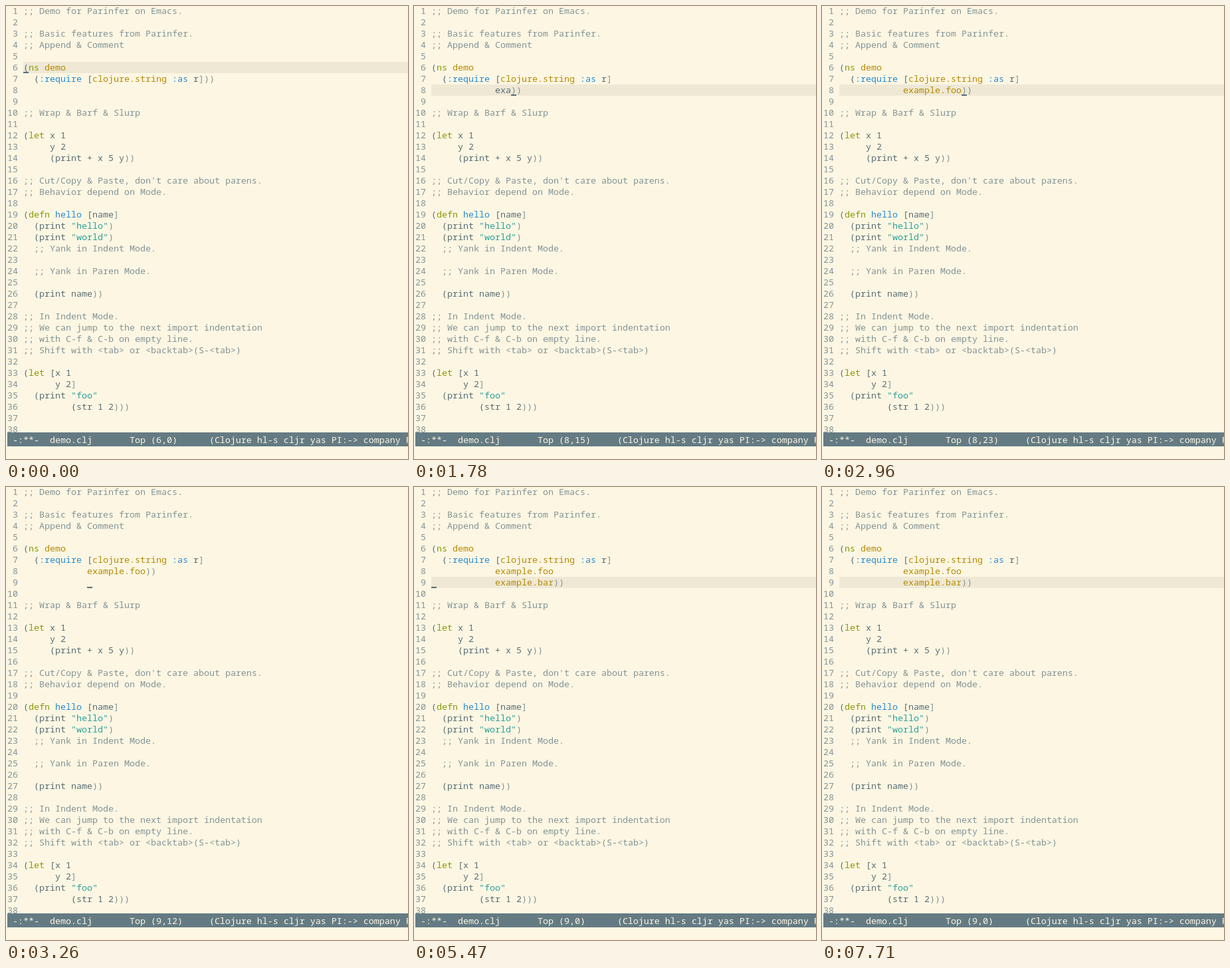
These frames come from a looping animation (605x681 px, 8 s). An HTML page:

```html
<!DOCTYPE html>
<html lang="en">
<head>
<meta charset="utf-8">
<title>Parinfer demo</title>
<style>
  html, body { margin: 0; width: 100%; height: 100%; overflow: hidden; background: #fdf6e3; }
  svg { display: block; }
  text { font: 500 13.333px "Noto Sans Mono", "DejaVu Sans Mono", monospace; white-space: pre; fill: #586e75; }
  .note, .dim, .num { fill: #839496; }
  .str { fill: #2aa198; }
  .key, .fn { fill: #268bd2; }
  .type { fill: #b58900; }
  .form { fill: #859900; }
  .hot { fill: #d33682; font-weight: bold; }
  .mode { fill: #fdf6e3; }
</style>
</head>
<body>
<svg id="stage" width="605" height="681" viewBox="0 0 605 681"></svg>
<script>
const LOOP = 8000, CW = 8, LH = 17, LEFT = 26, ROWS = 38;
const stage = document.getElementById("stage");

const head = [
  ";; Demo for Parinfer on Emacs.", "",
  ";; Basic features from Parinfer.",
  ";; Append & Comment", "",
  "(ns demo"
];
// Begins with the blank row that follows the edited lines
const tail = `
;; Wrap & Barf & Slurp

(let x 1
     y 2
     (print + x 5 y))

;; Cut/Copy & Paste, don't care about parens.
;; Behavior depend on Mode.

(defn hello [name]
  (print "hello")
  (print "world")
  ;; Yank in Indent Mode.

  ;; Yank in Paren Mode.

  (print name))

;; In Indent Mode.
;; We can jump to the next import indentation
;; with C-f & C-b on empty line.
;; Shift with <tab> or <backtab>(S-<tab>)

(let [x 1
      y 2]
  (print "foo"
         (str 1 2)))
`.split("\n");

const req = "  (:require [clojure.string :as r]";
const pad = " ".repeat(12);
const foo = pad + "example.foo", bar = pad + "example.bar";

// Each step: start time, changing lines, cursor row and column, flags
const steps = [];
const step = (at, lines, row, col, flags = {}) => steps.push({ at, lines, row, col, ...flags });

const closed = req + "))";
step(0, [closed, ""], 6, 0);
step(150, [closed, ""], 6, 0, { match: true });
step(290, [closed, ""], 8, 0);
step(890, [closed, ""], 8, 2);
step(1180, [closed, ""], 8, 12);

function type(word, keys, before, row) {
  for (const [at, n] of keys)
    step(at, [...before, pad + word.slice(0, n) + "))"], row, 12 + n);
}
type("example.foo", [[1630, 1], [1780, 3], [1930, 4], [2080, 6], [2370, 7],
  [2520, 8], [2670, 9], [2810, 10], [2960, 11]], [req], 8);
step(3260, [req, foo + "))", ""], 9, 12, { plain: true });
type("example.bar", [[3710, 1], [3860, 2], [4000, 3], [4150, 4], [4290, 5], [4440, 7],
  [4590, 8], [4730, 9], [4880, 10], [5020, 11]], [req, foo], 9);

const open = [req, foo, bar + "))"];
const noted = marks => [req, foo + "))", marks + bar + "))"];
step(5470, open, 9, 0);
step(6070, noted(";"), 9, 1);
step(6210, noted(";;"), 9, 2);
step(6960, noted(";"), 9, 1);
step(7110, open, 9, 0);
step(7710, open, 9, 0, { blink: true });

function el(tag, attrs, parent = stage) {
  const node = document.createElementNS("http://www.w3.org/2000/svg", tag);
  for (const k in attrs) node.setAttribute(k, attrs[k]);
  return parent.appendChild(node);
}

const rowTop = row => (row - 1) * LH - 1;
const syntax = /(?<note>;.*$)|(?<str>"[^"]*")|(?<dim>[\])](?=[\])]*$))|(?<key>:[a-z]+)|(?<type>[a-z]+\.[a-z]+|demo)|(?<form>\b(?:ns|let|defn)\b)|(?<fn>\bhello\b)|[a-z]+|./g;

function paint(node, line, hot) {
  node.textContent = "";
  for (const m of line.matchAll(syntax)) {
    const kind = Object.keys(m.groups).find(k => m.groups[k]);
    const cls = m.index === hot ? "hot" : kind;
    const last = node.lastChild;
    if (last && last.getAttribute("class") === (cls || "")) last.textContent += m[0];
    else el("tspan", { class: cls || "" }, node).textContent = m[0];
  }
}

const band = el("rect", { x: LEFT, width: 605 - LEFT, height: LH, fill: "#eee8d5" });
const rows = [];
for (let n = 1; n <= ROWS; n++) {
  const y = rowTop(n) + 13;
  el("text", { x: 2, y, class: "num" }).textContent = String(n).padStart(2);
  rows.push(el("text", { x: LEFT, y }));
}
const cursor = el("rect", { width: CW, height: 2, fill: "#586e75" });
el("rect", { x: 2, y: 641, width: 603, height: 21, fill: "#657b83" });
const mode = el("text", { x: 2, y: 657, class: "mode" });

let shown;
function render(t) {
  const s = steps.findLast(p => p.at <= t);
  if (s === shown) return;
  shown = s;
  const lines = [...head, ...s.lines, ...tail];
  rows.forEach((node, i) => {
    const line = lines[i] || "";
    const hot = !s.match ? -1 : i === 5 ? 0 : i === 6 ? line.length - 1 : -1;
    paint(node, line, hot);
  });
  band.setAttribute("y", rowTop(s.row));
  band.setAttribute("visibility", s.plain ? "hidden" : "visible");
  cursor.setAttribute("x", LEFT + s.col * CW);
  cursor.setAttribute("y", rowTop(s.row) + 15);
  cursor.setAttribute("visibility", s.blink ? "hidden" : "visible");
  const place = `Top (${s.row},${s.col})`.padEnd(15);
  mode.textContent = ` -:**-  demo.clj       ${place}(Clojure hl-s cljr yas PI:-> company P`;
}

const start = performance.now();
function tick(now) {
  render(Math.max(0, now - start) % LOOP);
  requestAnimationFrame(tick);
}
render(0);
requestAnimationFrame(tick);
</script>
</body>
</html>
```
